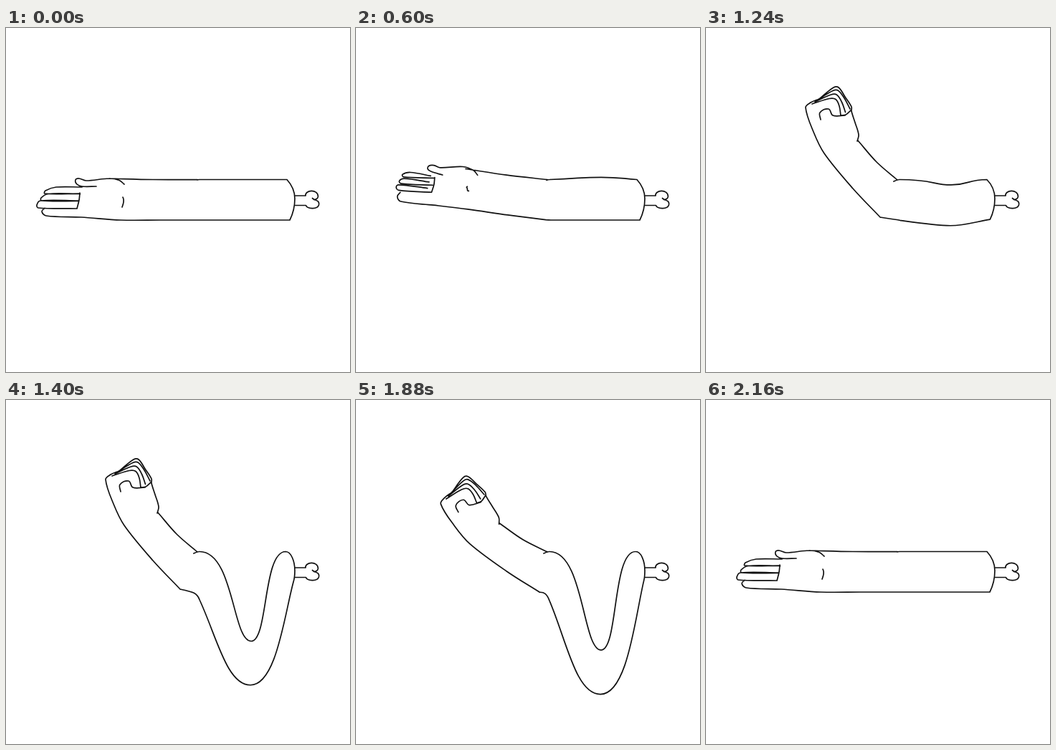
Write an HTML page that moves like this. It is 480 px wide and 480 px high and loops after 2.24 s.

```html
<!DOCTYPE html>
<html lang="en">
<head>
<meta charset="utf-8">
<title>Flexing arm</title>
<style>
  html, body { margin: 0; width: 100%; height: 100%; overflow: hidden; background: #fff; }
  svg { display: block; width: 100%; height: 100%; }
  path { fill: none; stroke: #111; stroke-width: 1.7; stroke-linecap: round; stroke-linejoin: round; }
</style>
</head>
<body>
<svg viewBox="0 0 480 480">
  <path d="M403.5 234H418C417 226 435 224 435.500 235Q435 239 430 239.500Q438 241 436.500 247C434 254 420 252 418.500 247.500H403.500M430 239.500L427.500 237.500"/>
  <path id="arm"/>
</svg>
<script>
const LOOP = 2240, STEP = 80, FLEX = 46, ELBOW = [267, 212], WRIST = [160, 240];

const clamp = v => Math.min(1, Math.max(0, v));
const ease = v => { v = clamp(v); return v * v * (3 - 2 * v); };
const mix = (a, b, k) => a + (b - a) * k;
const mixPts = (a, b, k) => a.map((p, i) => [mix(p[0], b[i][0], k), mix(p[1], b[i][1], k)]);
const pts = s => s.split(' ').map(p => p.split(',').map(Number));

function turn([x, y], [cx, cy], deg) {
  const r = deg * Math.PI / 180, c = Math.cos(r), s = Math.sin(r);
  x -= cx; y -= cy;
  return [cx + x * c - y * s, cy + x * s + y * c];
}

// A stroke in both poses: open on the level forearm, closed on the flexed one
const stroke = (open, fist) =>
  [pts(open), pts(fist).map(p => turn(p, ELBOW, -FLEX))];

const ring = stroke('99,252 45,251 43,247 48,241 101,241', '188,122 186,109 181,99.5 172,98.5 148,106');
const index = stroke('102,231 54,231 55,227 70,222 106,222', '201,113 193,98 184,87 177,87.5 156,100');
const fingers = [0, .5, 1].map(k => ring.map((p, i) => mixPts(p, index[i], k)));

const lower = stroke('268,268 215,268 160,268 105,264 56,262 50,256 54,251.5',
                     '243,264 205,224 165,175 150,145 139,111 146,104 158,99');
const thumb = stroke('165,218 158,212.5 144,210 112,213 102,210 97,212 99,218 106,221 126,221',
                     '211,158 213,149 208,132 203,116 203,110 194,96 185,83 178,83 158,99');
const palm = stroke('163,236 164,239 164,243 163,247 162,250', '160,128 159,118 171,113 177,122 194,122');
const roots = stroke('103,230 102,240 99,252', '202,115 195,121 188,122');
const upper = stroke('144,210 205,211.5 267,211.5', '212,157 238,187 267,212');
const forearm = [lower, ...fingers, thumb, palm, roots, upper];

// Smooth stroke through points, tangents along the neighbours' chord
function smooth(p) {
  const last = p.length - 1;
  const dir = p.map((_, i) => {
    const a = p[Math.max(i - 1, 0)], b = p[Math.min(i + 1, last)];
    const d = Math.hypot(b[0] - a[0], b[1] - a[1]) || 1;
    return [(b[0] - a[0]) / d, (b[1] - a[1]) / d];
  });
  const at = (i, h) => [p[i][0] + dir[i][0] * h, p[i][1] + dir[i][1] * h];
  let s = 'M' + p[0];
  for (let i = 0; i < last; i++) {
    const h = Math.hypot(p[i + 1][0] - p[i][0], p[i + 1][1] - p[i][1]) / 3;
    s += `C${at(i, h)} ${at(i + 1, -h)} ${p[i + 1]}`;
  }
  return s;
}

// Inner edge, shoulder end and outer edge, closing on the outer elbow
function upperArm({ curl, biceps, sag }, elbow) {
  const m = (a, b) => mix(a, b, sag);
  const top = 211.5, crest = top - 14 * biceps;
  const dip = top + 144.5 * sag - 20.5 * biceps, low = 268 + 150 * sag;
  return `M${267 - 5 * curl} ${212 + 2 * curl}Q267 ${top} 270 ${top}
    C318 ${crest} 316 ${dip} 342 ${dip}
    C366 ${dip} ${m(366, 357)} ${crest} ${m(392, 390)} ${top}
    C${m(397, 398)} ${m(217, 211)} 403 225 403 238
    C403 ${m(250, 243)} ${m(400, 403)} ${m(260, 247)} ${m(396, 402)} ${m(268, 251)}
    C${m(378, 390)} ${m(268, 305)} ${m(360, 380)} ${low} 341 ${low}
    C${m(322, 306)} ${low} 294 ${m(268, 340)} ${m(272, 270)} ${m(268, 281)}
    C${m(271, 266)} ${m(268, 270)} ${m(269, 262)} 268 ${elbow}`;
}

// Share of a movement done, held between steps
function phase(t, start, end) {
  if (t < start) return 0;
  if (t >= end) return 1;
  return (Math.floor((t - start) / STEP) + 1) * STEP / (end - start + STEP);
}

function pose(t) {
  const flex = phase(t, 480, 760), back = phase(t, 1880, 2160);
  const drop = phase(t, 1080, 1640 - STEP) * 7 / 8 + (t >= 1640) / 8;
  const grip = v => ease((v - .25) / .7);
  const lift = flex ** 2.3;
  return {
    angle: FLEX * lift * (1 - back) ** 1.45,
    curl: grip(flex) - grip(back),
    droop: -6.5 * Math.sin(Math.PI * flex),
    biceps: lift * clamp(1 - drop / .375),
    sag: ease((drop - .32) / .42) * (1 + .16 * (1 - drop)) * (1 - back ** 2)
  };
}

function armPath(now) {
  const lines = forearm.map(([open, fist]) => mixPts(open, fist, now.curl).map(p => {
    const bend = now.droop * clamp((WRIST[0] - p[0]) / 40);
    return turn(turn(p, WRIST, bend), ELBOW, now.angle);
  }));
  return lines.map(smooth).join('') + upperArm(now, lines[0][0]);
}

const arm = document.getElementById('arm');

function tick() {
  arm.setAttribute('d', armPath(pose(performance.now() % LOOP)));
  requestAnimationFrame(tick);
}
tick();
</script>
</body>
</html>
```
